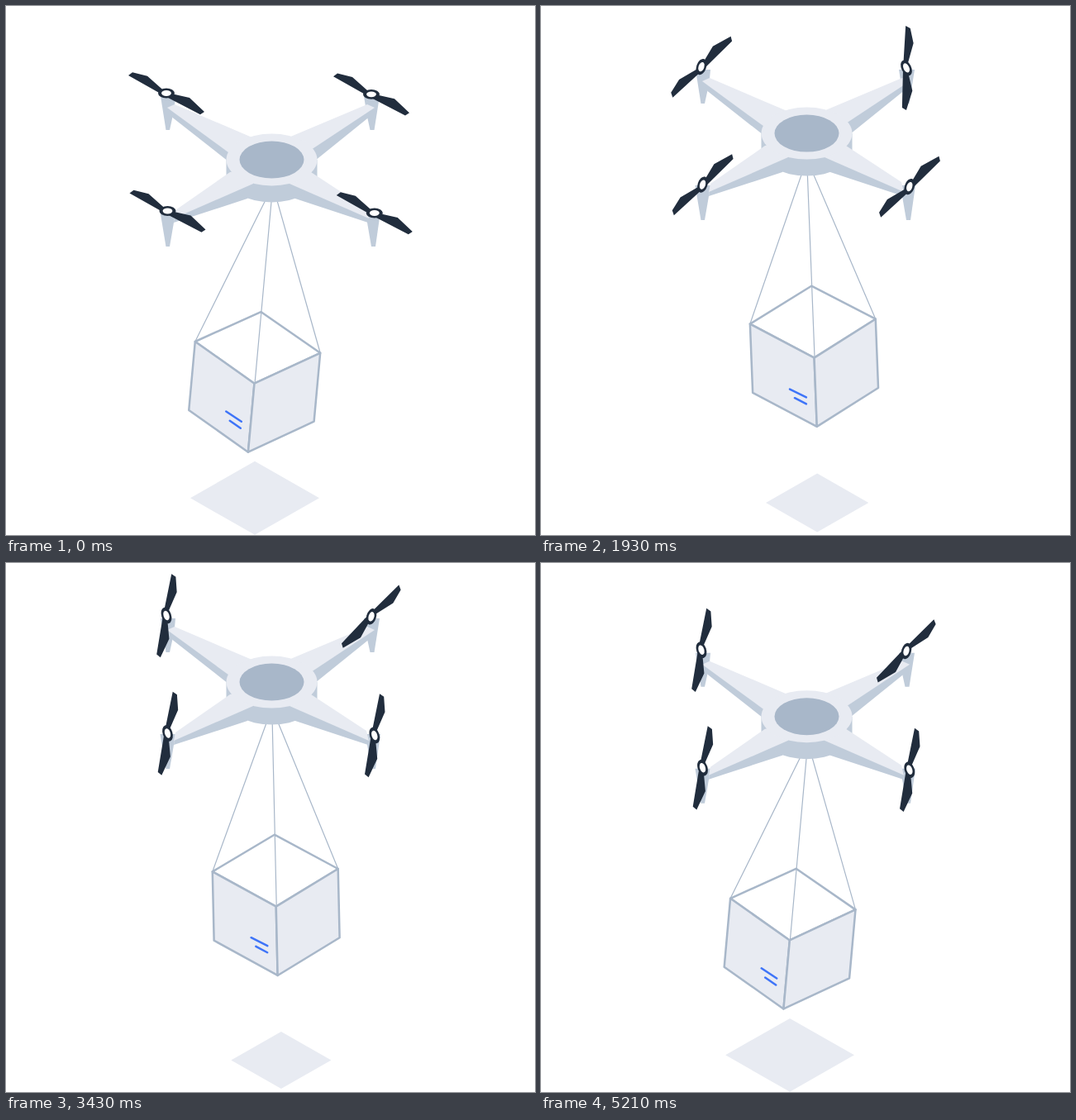
Recreate the animation shown at these times as an HTML page. Size 640 by 640 pixels, loop 5.28 s.

```html
<!DOCTYPE html>
<html lang="en">
<head>
<meta charset="utf-8">
<title>Drone delivery</title>
<style>
  html, body { margin: 0; width: 100%; height: 100%; overflow: hidden; background: #fff; }
  svg { display: block; width: 100%; height: 100%; }
  .light { fill: #e8ebf2; }
  .side { fill: #c0ccda; }
  .steel { fill: #a8b7c9; }
  .edge { stroke: #a8b7c9; stroke-width: 2.5; stroke-linejoin: round; }
  .rope { fill: none; stroke: #a8b7c9; stroke-width: 1.2; }
  .label { fill: none; stroke: #3e74f8; stroke-width: 2.5; stroke-linecap: round; }
  .dark { fill: #212d3d; }
</style>
</head>
<body>
<svg viewBox="0 0 640 640">
  <defs>
    <g id="prop">
      <path class="dark" d="M-46-21.5L-41-25.3L-23-20.8L-3-3L8 1L28 5.5L46 22.5L41 25.7L3 6L-7 .5Z"/>
      <ellipse class="dark" rx="10" ry="5.9"/>
      <ellipse rx="5.9" ry="3.4" fill="#fff"/>
    </g>
  </defs>

  <path id="shadow" class="light" d="M-78 0L0-44.5L78 0L0 44.5Z"/>

  <g id="drone">
    <g id="load">
      <path class="edge" fill="#fff" d="M245.5 413.7L321.5 370.7L397.5 413.7L321.5 457.7Z"/>
      <path class="edge light" d="M245.5 413.7L321.5 457.7V541L245.5 497Z"/>
      <path class="edge light" d="M397.5 413.7L321.5 457.7V541L397.5 497Z"/>
      <path class="label" d="M290.5 494.5L310 505M296 505.3L309.7 513"/>
      <path class="rope" d="M245.5 413.7L322 217L397.5 413.7M322 217V457.7"/>
    </g>

    <g class="side">
      <path d="M187 109H205L204 120L201.500 134L198 150H193.500Z"/>
      <path d="M433 109H452L445.500 150H440.500L437 134Z"/>
      <path d="M186.500 249H205L203 262L198 291H193.500Z"/>
      <path d="M435 249H453L447 291H442L437 262Z"/>
      <path d="M195 123L201.500 135L269 188L275 175Z"/>
      <path d="M446 123L438.500 135L374 187L366 171Z"/>
      <path d="M300 214L292 233L203 262L204 254Z"/>
      <path d="M342 214L350 233L438 262L437 254Z"/>
      <path d="M266.500 186V206A55 31.500 0 0 0 376.500 206V186Z"/>
    </g>
    <g class="light">
      <path d="M204 119L300 160L273 180L195 123Z"/>
      <path d="M437 119L342 159L369 174L446 123Z"/>
      <path d="M271 201L205 247L203 257L299 215L300 195Z"/>
      <path d="M369 201L436 245L439 257L343 215L340 195Z"/>
      <ellipse cx="321.500" cy="186" rx="55" ry="31.500"/>
    </g>
    <ellipse class="steel" cx="321.500" cy="186" rx="39" ry="22.500"/>

    <g transform="translate(194 105.500)"><use href="#prop" class="spin"/></g>
    <g transform="translate(195.500 248)"><use href="#prop" class="spin"/></g>
    <g transform="translate(445.800 250.500)"><use href="#prop" class="spin"/></g>
    <g transform="translate(442 106.800)"><use href="#prop" id="counterSpin"/></g>
  </g>
</svg>
<script>
const LOOP = 5280;
const STEPS = 74;
const [shadow, drone, load, counterSpin] =
  ['shadow', 'drone', 'load', 'counterSpin'].map(id => document.getElementById(id));
const spinners = document.querySelectorAll('.spin');

const linear = u => u;
const sine = u => (1 - Math.cos(Math.PI * u)) / 2;
// Cubic ease with chosen speeds at both ends.
const hermite = (a, b) => u =>
  3 * u * u - 2 * u ** 3 + a * u * (1 - u) ** 2 - b * u * u * (1 - u);

function track(times, values, ease, at) {
  let k = 0;
  while (k < times.length - 2 && at >= times[k + 1]) k++;
  const u = (at - times[k]) / (times[k + 1] - times[k]);
  return values[k] + (values[k + 1] - values[k]) * ease(u);
}

const hoverTimes = [0, 18.8, 36, 53.6, 74];
const lift = [0, -52.3, -8.3, -52, 0];
const shadowSize = [1, 0.75, 0.85, 0.754, 1];
const spinTimes = [0, 17, 27, 39, 48, 63, 73];
const spin = [0, -1008, -1512, -2160, -2448, -3204, -3528];
const counter = [0, 826, 1144, 1610, 1906, 2476.5, 2986];
const swingOut = hermite(0.45, 0);
const swingBack = hermite(0.09, 0.36);
const SWING_TURN = 35.5;

function swing(at) {
  return at < SWING_TURN
    ? 5.2 - 8.5 * swingOut(at / SWING_TURN)
    : -3.3 + 8.5 * swingBack((at - SWING_TURN) / (STEPS - SWING_TURN));
}

function draw(at) {
  const size = track(hoverTimes, shadowSize, sine, at);
  const x = 301 + 40 * sine(2 * at / STEPS);
  const y = 595.3 + 28 * (1 - size);
  shadow.setAttribute('transform', `translate(${x} ${y}) scale(${size})`);
  drone.setAttribute('transform', `translate(0 ${track(hoverTimes, lift, sine, at)})`);
  load.setAttribute('transform', `rotate(${swing(at)} 322 226)`);
  const angle = track(spinTimes, spin, linear, at);
  spinners.forEach(p => p.setAttribute('transform', `rotate(${angle})`));
  counterSpin.setAttribute('transform', `rotate(${track(spinTimes, counter, linear, at)})`);
}

// The motion is held at 14 steps per second, on a 10 ms grid.
function tick() {
  const ticks = Math.floor((performance.now() % LOOP) / 10);
  draw(Math.min(STEPS - 1, Math.floor((ticks + 0.5) * 0.14)));
  requestAnimationFrame(tick);
}
tick();
</script>
</body>
</html>
```
